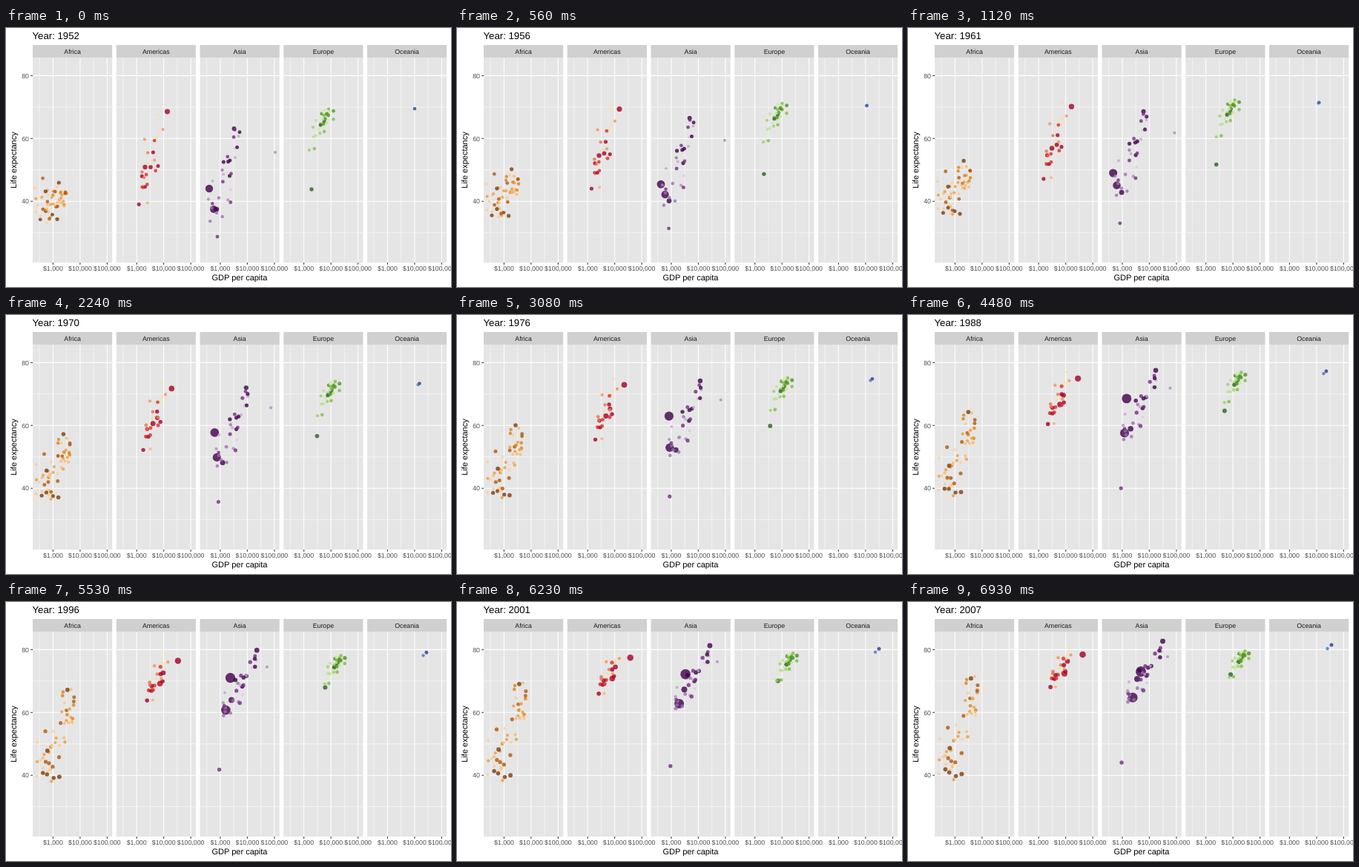
An HTML page for the animation above (7000 ms loop, 600 px wide and 350 px high).

```html
<!DOCTYPE html>
<html lang="en">
<head>
<meta charset="utf-8">
<title>Life expectancy and GDP</title>
<style>
  html, body { margin: 0; width: 100%; height: 100%; overflow: hidden; background: #fff; }
  svg { display: block; font-family: "Liberation Sans", Arial, sans-serif; text-rendering: geometricPrecision; }
</style>
</head>
<body>
<svg id="chart" width="600" height="350" viewBox="0 0 600 350"></svg>
<script>
const LOOP = 7000, STEP = 70, FRAMES = 100;
const TOP = 40.5, BOTTOM = 317, WIDTH = 107.2, DECADE = 36.5;

const steady = t => t;
const early = t => t ** 0.7;
const late = t => t ** 1.5;
const surge = t => 1.15 * t * t / (t * t + 0.15);

// Shades run from the smallest to the largest population.
const shades = {
  Africa: ["#fdcc8f", "#fdb863", "#f09a3c", "#e08214", "#b35806", "#7f3b08"],
  Americas: ["#fee090", "#fdae61", "#f98e52", "#f46d43", "#d73027", "#a50026"],
  Asia: ["#dcc8e2", "#c2a5cf", "#ae8bbd", "#9970ab", "#762a83", "#40004b"],
  Europe: ["#cdebaa", "#b8e186", "#9bcf63", "#7fbc41", "#4d9221", "#276419"],
  Oceania: ["#74add1", "#5c91c2", "#4575b4", "#3b55a4", "#313695", "#313695"]
};

const chart = document.getElementById("chart");
const mix = (a, b, k) => a + (b - a) * k;
const mixPoint = (a, b, k) => [mix(a[0], b[0], k), mix(a[1], b[1], k)];

let seed = 1952;
function random() {
  seed = (seed + 0x6d2b79f5) | 0;
  let n = Math.imul(seed ^ (seed >>> 15), seed | 1);
  n ^= n + Math.imul(n ^ (n >>> 7), n | 61);
  return ((n ^ (n >>> 14)) >>> 0) / 4294967296;
}
const scatter = () => (random() + random() + random()) / 1.5 - 1;

function add(tag, attributes, text = "") {
  const node = document.createElementNS("http://www.w3.org/2000/svg", tag);
  for (const key in attributes) node.setAttribute(key, attributes[key]);
  node.textContent = text;
  return chart.appendChild(node);
}
const box = (x, y, width, height, fill) => add("rect", { x, y, width, height, fill });
const line = (x1, y1, x2, y2, stroke, width) =>
  add("line", { x1, y1, x2, y2, stroke, "stroke-width": width });
const label = (text, x, y, size, fill, anchor = "middle", extra = {}) =>
  add("text", { x, y, fill, "font-size": size, "text-anchor": anchor, ...extra }, text);

const lifeY = life => 64.4 + (80 - life) * 4.245;

function drawPanel(name, index) {
  const left = 36 + 112.75 * index, right = left + WIDTH;
  const tickX = n => left + 27.4 + n * DECADE;
  box(left, 23, WIDTH, TOP - 23, "#d0d0d0");
  box(left, TOP, WIDTH, BOTTOM - TOP, "#e5e5e5");
  for (const life of [30, 50, 70]) line(left, lifeY(life), right, lifeY(life), "#fff", 0.53);
  for (const n of [-0.5, 0.5, 1.5]) line(tickX(n), TOP, tickX(n), BOTTOM, "#fff", 0.53);
  for (const life of [40, 60, 80]) line(left, lifeY(life), right, lifeY(life), "#fff", 1.07);
  ["$1,000", "$10,000", "$100,000"].forEach((text, n) => {
    line(tickX(n), TOP, tickX(n), BOTTOM, "#fff", 1.07);
    line(tickX(n), BOTTOM, tickX(n), BOTTOM + 2.7, "#333", 1.07);
    label(text, tickX(n), 328, 8.8, "#4d4d4d");
  });
  label(name, (left + right) / 2, 34.5, 8.8, "#1a1a1a");
}

// Population is in millions; income eases x, health eases y.
const dots = [];
function addDot(continent, population, from, to, income = early, health = early) {
  const palette = shades[continent];
  const rank = Math.min(0.999, Math.cbrt(population / 60));
  const fill = palette[Math.floor(rank * palette.length)];
  const node = add("circle", { fill, "fill-opacity": 0.8 });
  dots.push({ node, population, from, to, income, health });
}

// Scatters dots along a poor-to-rich line that moves from one place to another.
function addCloud(continent, count, { from, to, spread, shrink = 1, bias = 1 }) {
  for (let i = 0; i < count; i++) {
    const along = random() ** bias;
    const dx = scatter() * spread[0], dy = scatter() * spread[1];
    const place = (ends, size) => {
      const [x, y] = mixPoint(...ends, along);
      return [x + dx * size, y + dy * size];
    };
    addDot(continent, 60 * random() ** 3, place(from, 1), place(to, shrink));
  }
}

Object.keys(shades).forEach(drawPanel);
for (const life of [40, 60, 80]) {
  line(33.3, lifeY(life), 36, lifeY(life), "#333", 1.07);
  label(life, 31, lifeY(life) + 3.2, 8.8, "#4d4d4d", "end");
}
label("GDP per capita", 315, 341, 11, "#000");
label("Life expectancy", 0, 0, 11, "#000", "middle", { transform: "translate(13.5 178.5) rotate(-90)" });
const title = label("", 35.5, 15, 13.2, "#000", "start");

addDot("Americas", 301, [217.5, 113], [235.5, 71], steady, steady);
addDot("Americas", 190, [187.5, 188], [211, 97]);
addDot("Americas", 108, [195, 188], [215, 80]);
addDot("Asia", 1318, [274, 217], [314, 94], late, surge);
addDot("Asia", 1110, [280, 245], [303, 129], late);
addDot("Asia", 224, [284, 245], [309, 104], steady, steady);
addDot("Asia", 127, [307.5, 136], [343.5, 53]);
addDot("Asia", 32, [285, 282], [288, 217]);
addDot("Asia", 2.5, [363, 168], [350, 74]);
addDot("Europe", 71, [412, 218], [435, 98], steady);
addDot("Oceania", 20, [551, 109], [571, 58], steady, steady);
addDot("Oceania", 4, [551, 109], [565.5, 63], steady, steady);

addCloud("Africa", 52, {
  from: [[50, 241], [76, 222]], to: [[52, 225], [92, 98]], spread: [24, 42], bias: 1.6 });
addCloud("Americas", 22, {
  from: [[184, 225], [208, 135]], to: [[194, 108], [220, 72]], spread: [14, 40], shrink: 0.5 });
addCloud("Asia", 27, {
  from: [[277, 248], [318, 142]], to: [[294, 130], [346, 64]], spread: [22, 45], shrink: 0.5 });
addCloud("Europe", 29, {
  from: [[410, 162], [442, 98]], to: [[434, 98], [460, 60]], spread: [12, 16], shrink: 0.8, bias: 0.7 });

function render() {
  const progress = Math.floor(performance.now() % LOOP / STEP) / (FRAMES - 1);
  title.textContent = "Year: " + Math.round(1952 + 55 * progress);
  for (const { node, population, from, to, income, health } of dots) {
    const current = population * mix(0.42, 1, progress);
    node.setAttribute("cx", mix(from[0], to[0], income(progress)));
    node.setAttribute("cy", mix(from[1], to[1], health(progress)));
    node.setAttribute("r", 1.9 + 5.1 * Math.sqrt(current / 1318));
  }
  requestAnimationFrame(render);
}
render();
</script>
</body>
</html>
```
